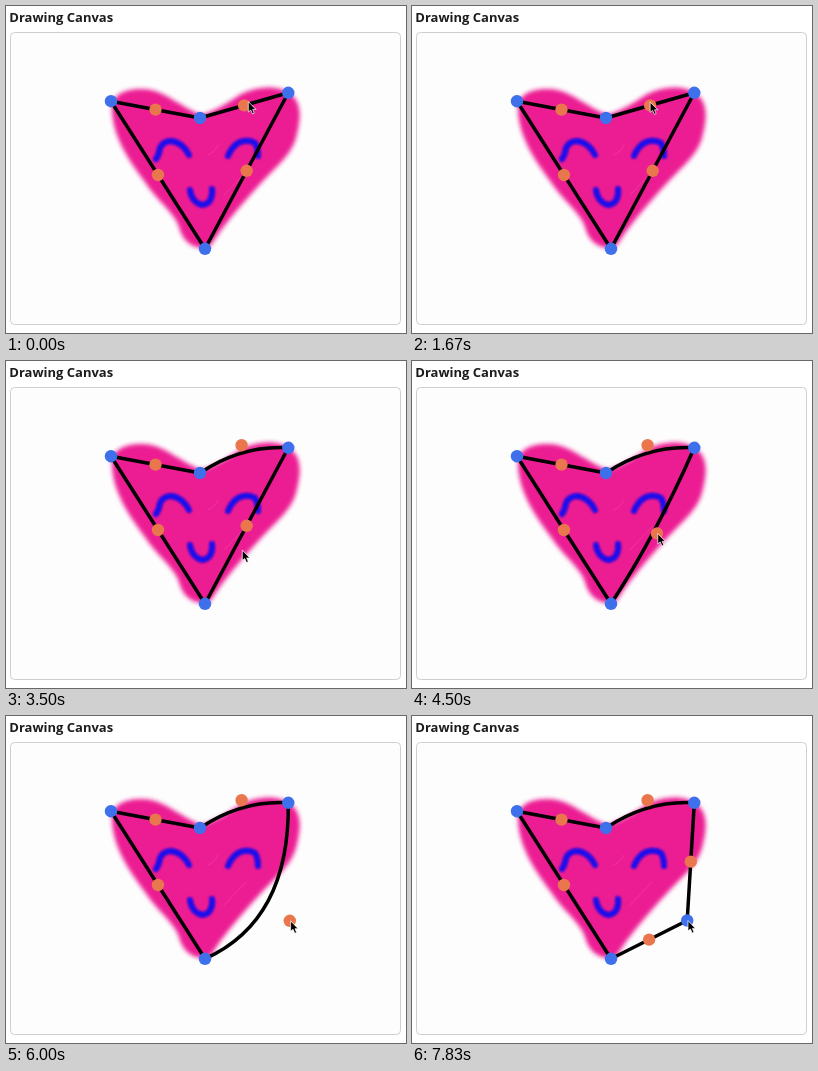
These frames come from a looping animation (400x327 px, 8 s). An HTML page:

```html
<!DOCTYPE html>
<html lang="en">
<head>
<meta charset="utf-8">
<title>Drawing Canvas</title>
<style>
  html, body { margin: 0; width: 100%; height: 100%; overflow: hidden; background: #fff; }
  svg { display: block; width: 100%; height: 100%; }
  path { fill: none; stroke-linecap: round; stroke-linejoin: round; }
  .title { font: 700 13px "Open Sans", sans-serif; fill: #1c1c1c; }
  .board { fill: #fdfdfd; stroke: #cfcfcf; }
  .heart { fill: #ec1a93; filter: url(#soft); }
  .streak { stroke: #f345a5; opacity: .6; }
  .face { stroke: #1f08ea; stroke-width: 6; filter: url(#ink); }
  .outline { stroke: #000; stroke-width: 3.5; }
  .corner { fill: #3e70ec; }
  .handle { fill: #e9764d; }
  .cursor { fill: #000; stroke: #fff; stroke-width: .7; }
</style>
</head>
<body>
<svg viewBox="0 0 400 327">
  <filter id="soft"><feGaussianBlur stdDeviation="2"/></filter>
  <filter id="ink"><feGaussianBlur stdDeviation=".8"/></filter>
  <text class="title" x="3.3" y="16">Drawing Canvas</text>
  <rect class="board" x="4.5" y="26.5" width="390" height="292" rx="4"/>
  <path class="heart" d="M195 109 C209 105 220 98 232 90 S268 77 283 87 S294 116 290 132
    S270 161 256 176 S228 207 216 223 S206 243 195 242 S176 233 173 221
    S152 195 141 179 S107 136 106 104 C104 84 130 81 145 84 S176 101 195 109 Z"/>
  <path class="streak" d="M202 149 Q209 146 212 139 M218 189 L240 166"/>
  <g class="face">
    <path d="M150 153 Q153 149 154 142 Q157 135 166 135 Q177 137 183 149"/>
    <path d="M222 150 Q226 140 234 136 Q243 133 249 137 Q252 142 252 150"/>
    <path d="M184 184 Q185 191 189 195 Q196 202 203 196 Q207 191 206 183"/>
  </g>
  <path id="outline" class="outline"/>
  <g id="dots"></g>
  <path id="cursor" class="cursor" d="M0 0 V10 L2.4 8 L4.2 12 L6 11.2 L4.4 7.4 H7.4 Z"/>
</svg>
<script>
const LOOP = 8000, STEP = 1000 / 6, SPLIT = 6820;
const topLeft = [105, 95.2], dip = [194, 112], topRight = [282.3, 86.8], tip = [199, 242.8];
const topPull = [235.6, 84.2], sidePull = [283.8, 204.8], cornerPull = [275.2, 204.5];

const byId = id => document.getElementById(id);
const linear = p => p;
const easeOut = p => p * (2 - p);
const mid = (a, b) => [(a[0] + b[0]) / 2, (a[1] + b[1]) / 2];
const offset = (p, dx, dy) => [p[0] + dx, p[1] + dy];

// Moves from a to b between two times; b itself may be moving.
function glide(t, a, b, start, end, easeY = linear) {
  const p = Math.min(1, Math.max(0, (t - start) / (end - start)));
  return [a[0] + (b[0] - a[0]) * p, a[1] + (b[1] - a[1]) * easeY(p)];
}

function pointer(t, top, side) {
  let p = glide(t, [242.3, 96], [236.3, 91], 0, 833);
  p = glide(t, p, offset(top, 0, -3), 1000, 1667);
  p = glide(t, p, [236.3, 189.5], 3000, 3500);
  return glide(t, p, offset(side, .8, .5), 3500, 4167);
}

function makeDot(kind) {
  const dot = document.createElementNS("http://www.w3.org/2000/svg", "circle");
  dot.setAttribute("class", kind);
  dot.setAttribute("r", 6.2);
  return byId("dots").appendChild(dot);
}

function place(dot, [x, y]) {
  dot.setAttribute("cx", x);
  dot.setAttribute("cy", y);
}

for (const point of [topLeft, dip, topRight, tip]) place(makeDot("corner"), point);
for (const end of [dip, tip]) place(makeDot("handle"), mid(topLeft, end));
const topHandle = makeDot("handle"), sideHandle = makeDot("handle");
const lowHandle = makeDot("handle"), newCorner = makeDot("corner");

function draw(elapsed) {
  // Steps land on whole hundredths of a second, hence the small lead.
  const t = Math.floor((elapsed % LOOP + 4) / STEP) * STEP;
  const split = t >= SPLIT;
  const top = glide(t, mid(dip, topRight), topPull, 1833, 3000);
  const bend = glide(t, mid(topRight, tip), sidePull, 4333, 6000, easeOut);
  const side = glide(t, bend, cornerPull, SPLIT, 7667);

  const sidePath = split ? `L${side} L${tip}` : `Q${side} ${tip}`;
  byId("outline").setAttribute("d", `M${topLeft} L${dip} Q${top} ${topRight} ${sidePath} Z`);
  place(topHandle, top);
  place(sideHandle, split ? mid(topRight, side) : side);
  place(lowHandle, mid(side, tip));
  place(newCorner, side);
  for (const dot of [lowHandle, newCorner]) dot.style.display = split ? "" : "none";
  byId("cursor").setAttribute("transform", `translate(${pointer(t, top, side)})`);
}

const start = performance.now();
function tick() {
  draw(performance.now() - start);
  requestAnimationFrame(tick);
}
tick();
</script>
</body>
</html>
```
